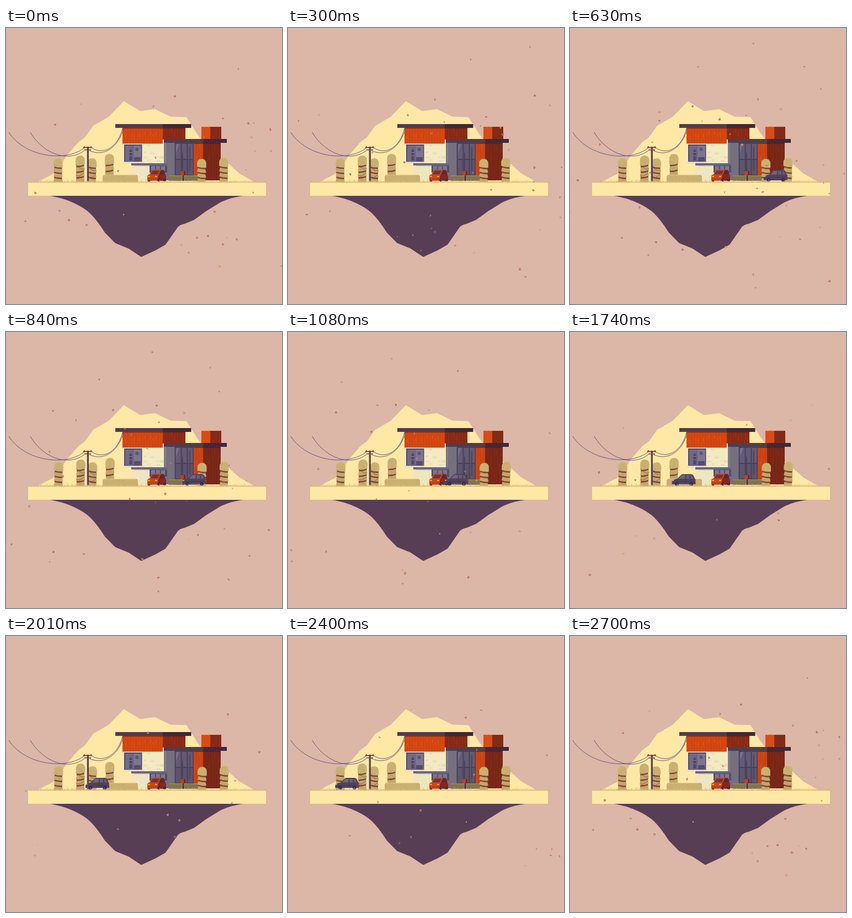
Animation, 500 px wide and 500 px high, one loop 2730 ms. Source, as an HTML page with a canvas:

```html
<!DOCTYPE html>
<html lang="en">
<head>
<meta charset="utf-8">
<title>Floating house</title>
<style>
html, body { margin: 0; width: 100%; height: 100%; overflow: hidden; background: #dcb6a6; }
canvas { display: block; width: 500px; height: 500px; }
</style>
</head>
<body>
<canvas id="stage" width="500" height="500"></canvas>
<script>
const LOOP = 2730, STEP = 30, TAU = Math.PI * 2;
const stage = document.getElementById('stage').getContext('2d');
let c = stage;

function seeded(seed) {
  return () => {
    seed = (seed * 1664525 + 1013904223) >>> 0;
    return seed / 4294967296;
  };
}
function rect(x, y, w, h, color) {
  c.fillStyle = color;
  c.fillRect(x, y, w, h);
}
function fillPath(d, color) {
  c.fillStyle = color;
  c.fill(new Path2D(d));
}
function strokePath(d, color, width = 1) {
  c.strokeStyle = color;
  c.lineWidth = width;
  c.stroke(new Path2D(d));
}
function disc(x, y, r, color) {
  c.fillStyle = color;
  c.beginPath();
  c.arc(x, y, r, 0, TAU);
  c.fill();
}
function layer(paint) {
  const canvas = document.createElement('canvas');
  canvas.width = canvas.height = 500;
  c = canvas.getContext('2d');
  paint();
  c = stage;
  return canvas;
}

// Vertical boards with scattered light scratches.
function siding(x, y, w, h, base, line, glint, seed) {
  const rand = seeded(seed);
  rect(x, y, w, h, base);
  for (let i = 4; i < w; i += 5) {
    rect(x + i, y, 0.6, h, line);
    if (rand() < 0.5) rect(x + i + 1, y + rand() * h * 0.75, 0.6, 2 + rand() * h * 0.2, glint);
  }
}

function paintIsland() {
  rect(0, 0, 500, 500, '#dcb6a6');
  fillPath('M57 279L88 263L100 247L110 231L131 207L143 198L158 177L186 161L213.5 132.5L243 150.5L270 147L298 160.5L327 161.5L345 190L362 214L400 243L422 263L450 279Z', '#ffe8a5');
  fillPath('M74 303Q102 307 124 317.5Q142 326 152 335.5Q164 347 179 370.5L197.5 389.5L222 399.5L245 414.7L271 402.7L289 392.5L311 361Q314 356.5 324 354.5L341 347.5L363 331.5L389 315.5Q409 306 437 303Z', '#573e55');
  rect(40, 280, 431, 24, '#ffe8a5');
}

function paintHouse() {
  rect(212, 208, 75, 37, '#f3eac2');
  rect(227, 244, 60, 33, '#f0e5bd');
  const rand = seeded(8);
  for (let i = 0; i < 9; i++) {
    rect(248 + rand() * 32, 212 + rand() * 28, 4 + rand() * 4, 2.5, 'rgba(211,200,165,.4)');
  }
  rect(214, 211, 32.5, 31.5, '#554a66');
  rect(216, 213, 29, 28, '#7b7590');
  rect(216, 213, 13, 28, '#706a86');
  rect(229.5, 213, 1, 28, '#5a5070');
  fillPath('M223.5 240V223L226 218L228.5 223V240Z', '#514663');
  rect(223, 225, 6, 1, '#85809a');
  rect(223, 231, 6, 1, '#85809a');
  disc(237.5, 220, 3, '#5d536f');
  rect(232, 234, 12, 7, '#574c69');
  rect(212, 242.5, 37, 2, '#e5dab6');

  siding(211, 181, 73, 28.5, '#d54811', '#c33f0f', '#e8713b', 4);
  siding(284, 181, 41, 21, '#8c2c15', '#742315', '#a84526', 6);
  rect(211, 181, 114, 1.5, 'rgba(95,30,32,.5)');
  rect(198, 174, 86, 7, '#4b3e54');
  rect(284, 174, 51.5, 7, '#392b3d');

  rect(286, 208, 54, 68, '#75707f');
  rect(286, 208, 4, 68, '#7f7988');
  rect(305.5, 208, 35, 59, '#4a4059');
  for (let i = 0; i < 3; i++) {
    rect(307.5 + i * 11, 210, 9, 27, '#635b73');
    rect(307.5 + i * 11, 239, 9, 27, '#5d546d');
  }
  fillPath('M309 210H314L308 226V213Z', '#77708a');
  rect(319, 226, 1.5, 40, '#463b55');
  rect(332, 215, 2, 44, '#50455e');

  siding(340, 208, 17, 68, '#d04411', '#bd3b10', '#df622d', 13);
  siding(357, 208, 32, 68, '#7c2817', '#6c2116', '#933a24', 15);
  rect(340, 208, 49, 2, 'rgba(70,24,32,.55)');
  rect(354, 179, 16, 22, '#d84d14');
  rect(370, 179, 20, 22, '#842b17');
  rect(286, 201, 71, 7, '#4b3e54');
  rect(357, 201, 43, 7, '#392b3d');

  rect(227, 245, 65, 4, '#6b657b');
  rect(260, 249, 32, 13, '#575069');
  for (let x = 263; x < 290; x += 9) rect(x, 250, 7, 10, '#7d778d');
  rect(232, 249, 28, 2, '#d9cfae');

  rect(295, 267, 54, 10, '#81734f');
  rect(295, 267, 54, 1.5, '#9c8b5f');
  rect(320, 265, 2, 12, '#3e2d40');
  fillPath('M316 267V261Q316 259 318 259H323Q325 259 325 261V267Z', '#c43e16');
  rect(322, 259, 3, 8, '#7c291c');
}

function paintFront() {
  fillPath('M175 279V270Q175 266 180 266H235Q239 266 239 270V279Z', '#cab172');
  rect(179, 266, 56, 1.5, '#d6be80');
  const rand = seeded(42);
  for (let i = 0; i < 30; i++) rect(177 + rand() * 60, 268 + rand() * 9, 1.2, 0.8, '#bba365');
}

function paintGrass() {
  const rand = seeded(77);
  rect(40, 278.5, 436, 1.7, '#dbc080');
  for (let x = 40; x < 475; x += 1.7) {
    const h = 1.5 + rand() * 3.5;
    strokePath(`M${x} 280L${x + rand() * 3 - 1.5} ${280 - h}`, rand() < 0.5 ? '#dcc283' : '#cfb274', 0.7);
  }
}

const island = layer(() => { paintIsland(); paintHouse(); });
const hedge = layer(paintFront);
const grass = layer(paintGrass);

// A clipped tree: a round cap above three flared skirts.
function tree(x, top, i, t) {
  const sway = 1.7 * (0.5 - 0.5 * Math.cos(TAU * (t / LOOP - (i > 3 ? 0.04 : -0.03))));
  const h = 279 - top, cap = h * 0.36, tier = (h - cap) / 3;
  const lean = i === 1 || i === 3 ? -1.2 : 1;
  c.save();
  c.translate(x - 0.6 + sway * 0.35, 279);
  c.transform(1, 0, -sway * 0.65 / h, 1, 0, 0);
  fillPath(`M-7 0V${-h + 10}H7V0Z`, '#8f4630');
  for (let k = 2; k >= 0; k--) {
    const y = cap - h + k * tier;
    fillPath(`M-6.5 ${y + 2.5 - lean}Q0 ${y + 4} 6.5 ${y + 2.5 + lean}L8.2 ${y + tier + lean}Q0 ${y + tier + 2} -8.2 ${y + tier - lean}Z`, '#c2a76a');
    strokePath(`M-7 ${y + 2.3 - lean}Q0 ${y + 4} 7 ${y + 2.3 + lean}`, '#653d38', 0.8);
  }
  fillPath(`M-8.3 ${cap - h - lean}V${8 - h}Q-7.5 ${-h} 0 ${-h}Q7.5 ${-h} 8.3 ${8 - h}V${cap - h + lean}Q0 ${cap - h + 2} -8.3 ${cap - h - lean}Z`, '#cab172');
  if (i === 1 || i === 2) {
    strokePath(`M-7 ${cap - h}Q2 ${cap - h + 10} 8 ${cap - h + 6}M7 ${cap - h + 14}Q-3 ${cap - h + 23} -8 ${cap - h + 18}`, '#69474a', 0.7);
  }
  const rand = seeded(i + 3);
  for (let k = 0; k < 6; k++) rect(rand() * 11 - 6, 4 - h + rand() * cap * 0.7, 1.4, 0.7, '#b79e64');
  c.restore();
}

function pole(t) {
  const dip = 0.5 * Math.sin(TAU * t / LOOP);
  const wires = [
    `M5 189C35 ${235 + dip} 110 ${243 + dip} 142 217`,
    `M44 189C65 ${225 + dip} 110 ${246 - dip} 142 222`,
    `M155 217C177 ${231 + dip} 203 ${216 + dip} 211 182`,
    `M151 222C178 ${235 + dip} 204 ${215 - dip} 213 182`
  ];
  wires.forEach(d => strokePath(d, '#5d4a70', 0.9));
  rect(146.7, 215, 3, 63, '#594560');
  rect(149, 215, 0.8, 63, '#44354d');
  rect(140, 215.5, 16, 2, '#7c4038');
  rect(142, 220, 12, 1.5, '#744338');
  rect(141, 214, 2, 2, '#b6532f');
  rect(153, 214, 2, 2, '#b6532f');
}

function wheel(x, y, r) {
  disc(x, y, r, '#30263a');
  disc(x, y, r * 0.35, '#655a70');
}

// Seen at an angle: bright front on the left, shaded side on the right.
function redCar() {
  fillPath('M272 277L275 266L279 257H285Q287 257 288 262L290 268V277Z', '#84281a');
  fillPath('M256 277V269Q256 266 260 265L264 258Q265 256.5 268 256.5H281L277 265Q275 267 275 270V277Z', '#d14512');
  fillPath('M261.5 265L265.5 258.5H278L275 265Z', '#61384a');
  fillPath('M278.5 265L281.5 259H285L287 265Z', '#4a2c3f');
  rect(257, 268, 4, 2, '#eea05a');
  rect(270, 268, 4, 2, '#eea05a');
  rect(256, 273, 19, 1, '#9c301a');
  rect(257, 276, 4, 2.5, '#3c2937');
  wheel(277, 275.5, 2.8);
  wheel(287, 275.5, 2.5);
}

function darkCar(t) {
  const grow = Math.min(1, Math.max(0, (t - 360) / 180), Math.max(0, (2610 - t) / 180));
  if (!grow) return;
  const ease = grow * (2 - grow);
  c.save();
  c.translate(373 - 0.15 * (t - 630), 278);
  c.scale(ease, ease);
  c.translate(0, Math.sin(t / 65) * 0.3);
  fillPath('M-22 -2.5V-7Q-21 -11 -12 -12.5L-5 -19.5Q-4 -20.8 -1 -20.8H13Q17 -20.8 19 -14L21 -11V-2.5Z', '#4d4260');
  fillPath('M-9.5 -12.5L-4 -18.8H2V-12.5Z', '#70667f');
  fillPath('M4 -18.8H10V-12.5H4Z', '#685e78');
  fillPath('M12 -18.8Q15 -18.8 17 -12.5H12Z', '#685e78');
  strokePath('M-21 -7H20M3 -12V-4', '#41374f', 0.7);
  rect(-21.5, -10, 3, 1.8, '#cfa47a');
  rect(19, -10, 2, 2.5, '#964537');
  wheel(-13, -2.8, 3.2);
  wheel(13, -2.8, 3.2);
  c.restore();
}

// Each triple: x and y at the loop start, then leftward travel per step.
const seeds = [
  421, 74, 9, 306, 124, 4, 267, 142, 5, 136, 138, 8, 89, 175, 7, 393, 164, 11,
  439, 173, 8, 449, 172, 10, 479, 184, 9, 451, 223, 7, 445, 198, 6, 480, 223, 8,
  435, 257, 10, 448, 298, 8, 378, 333, 12, 97, 331, 13, 114, 348, 8, 146, 357, 7,
  35, 350, 7, 53, 299, 10, 213, 338, 10, 366, 377, 10, 346, 380, 12, 400, 380, 14,
  418, 383, 10, 393, 392, 9, 318, 393, 12, 331, 407, 9, 387, 432, 5, 271, 235, 6,
  243, 222, 9, 203, 259, 9, 359, 198, 10, 500, 431, 8
];
const leafRand = seeded(219);
const leaves = [];
function addLeaf(x, y, speed) {
  leaves.push({
    x, y, travel: speed * LOOP / STEP,
    birth: 0.12 + leafRand() * 0.76,
    size: 1 + leafRand() * 0.9,
    wave: 5 + leafRand() * 16,
    turn: leafRand() * TAU,
    color: ['#b27767', '#aa6d60', '#b88169', '#c59a7a'][Math.floor(leafRand() * 4)]
  });
}
for (let i = 0; i < seeds.length; i += 3) addLeaf(seeds[i], seeds[i + 1], seeds[i + 2]);
leaves[20].color = '#dfb56d';
leaves[28].color = '#d5a069';
for (let i = 0; i < 24; i++) addLeaf(510 + leafRand() * 180, 22 + leafRand() * 450, 7 + leafRand() * 3);

function leaf(p, t) {
  const life = (p.birth + t / LOOP) % 1;
  const x = p.x - p.travel * (life - p.birth);
  if (x < -5 || x > 505) return;
  const bob = a => Math.sin(TAU * 2 * a + p.turn);
  const y = p.y + p.wave * (bob(life) - bob(p.birth));
  const size = p.size * Math.min(1, life * 12, (1 - life) * 12);
  c.save();
  c.translate(x, y);
  c.rotate(p.turn + TAU * 3 * t / LOOP);
  c.scale(size, size * (0.75 + 0.25 * Math.cos(TAU * 4 * t / LOOP + p.turn)));
  fillPath('M0 1.4L-1.2 .1Q-1.5 -1 -.6 -1.1Q0 -1.1 0 -.5Q.3 -1.3 1 -1Q1.7 -.5 .8 .7Z', p.color);
  c.restore();
}

const trees = [[95, 236], [135, 231], [156.5, 236], [188, 228], [355, 237], [395, 235]];

function draw(t) {
  c.drawImage(island, 0, 0);
  trees.forEach(([x, top], i) => tree(x, top, i, t));
  c.drawImage(hedge, 0, 0);
  pole(t);
  redCar();
  darkCar(t);
  c.drawImage(grass, 0, 0);
  leaves.forEach(p => leaf(p, t));
}

function tick() {
  const t = performance.now() % LOOP;
  draw(Math.floor(t / STEP) * STEP);
  requestAnimationFrame(tick);
}
tick();
</script>
</body>
</html>
```
